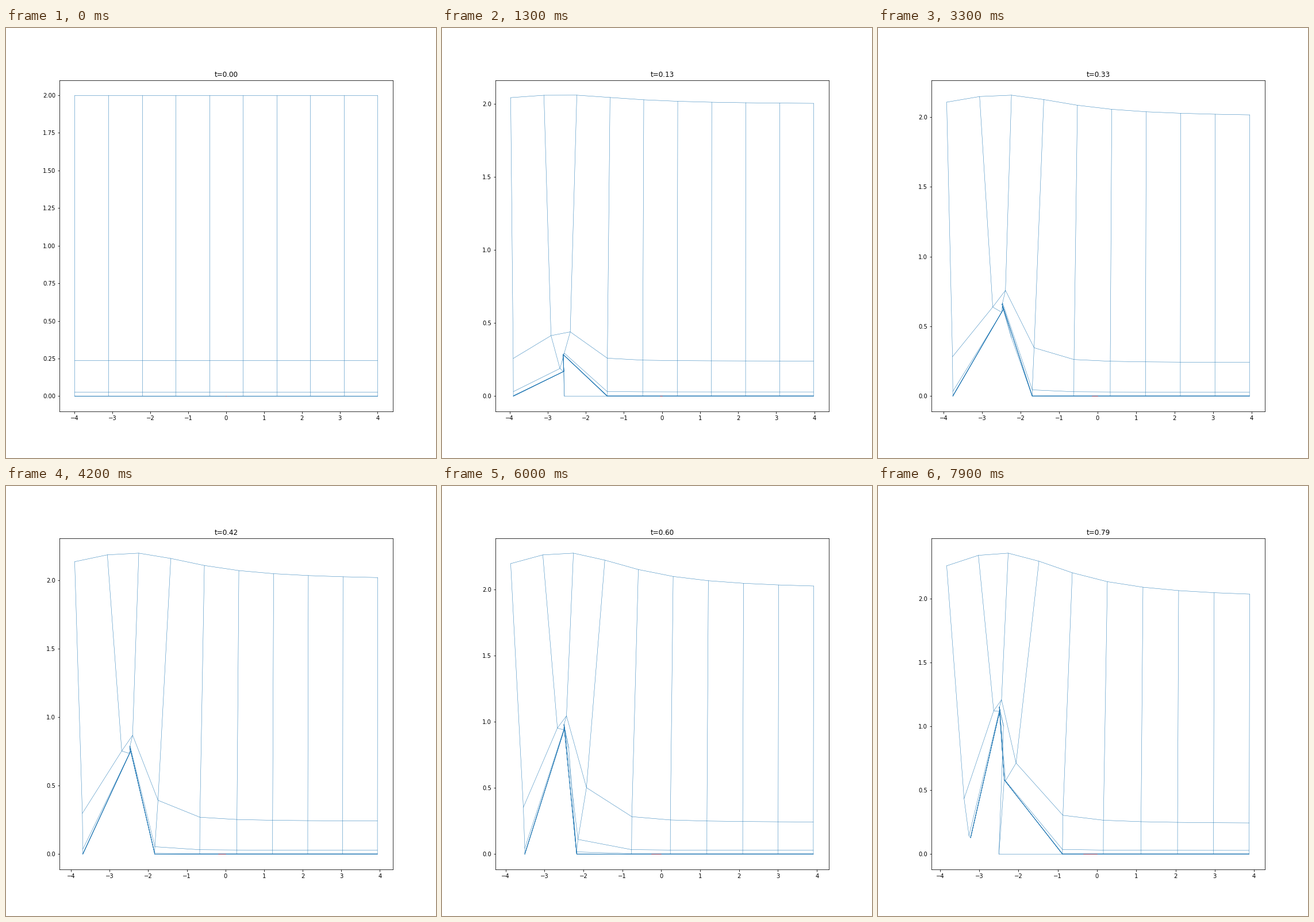
Recreate the animation shown at these times as a matplotlib script. Size 748 by 748 pixels, loop 8000 ms.

```python
import numpy as np
import matplotlib.pyplot as plt
from matplotlib.animation import FuncAnimation

N, FRAMES, SUBSTEPS = 10, 80, 10
DT = .01 / SUBSTEPS
SIZE = 748

# Position of the sink on the real axis: (until, first, last)
DRIVE = [(.22, -2.72, -2.45), (.33, -2.24, -2.24), (.51, -2.46, -2.46),
         (.59, -2.80, -2.80), (.775, -2.27, -2.48), (.81, -3.22, -3.22)]


def sink(t):
    begin = 0
    for until, first, last in DRIVE:
        if t < until:
            return first + (last - first) * (t - begin) / (until - begin)
        begin = until
    return last


def step(z, c):
    """Advance dz/dt = -1 / (z - c) exactly over DT, in the upper half plane."""
    d = z - c
    # Wall points well to the left of the sink are free to leave the wall
    d = np.where((d.imag == 0) & (d.real < -.1), d + 1e-9j, d)
    wall = np.sign(d.real) * np.sqrt(np.maximum(d.real ** 2 - 2 * DT, 0))
    root = np.sqrt(d * d - 2 * DT)
    root = np.where(root.imag < 0, -root, root)
    return c + np.where(d.imag == 0, wall, root)


def simulate():
    heights = np.append(2 * .12 ** np.arange(N - 1), 0)
    grid = np.linspace(-4, 4, N) + 1j * heights[:, None]
    z = np.append(grid.ravel(), 0)          # the last point is the tracer
    states = []
    for f in range(FRAMES):
        states.append(z)
        for s in range(SUBSTEPS):
            z = step(z, sink((f * SUBSTEPS + s + .5) * DT))
    return states


states = simulate()

fig, ax = plt.subplots(figsize=(SIZE / 72, SIZE / 72), dpi=72)
fig.subplots_adjust(left=.1245, right=.8995, bottom=.1088, top=.8788)
rows = [ax.plot([], [], color='C0', lw=.5)[0] for _ in range(N)]
cols = [ax.plot([], [], color='C0', lw=.5)[0] for _ in range(N)]
trail, = ax.plot([], [], color='red', lw=.5)
title = ax.set_title('')


def update(frame):
    z = states[frame]
    grid = z[:-1].reshape(N, N)
    for line, p in zip(rows + cols, [*grid, *grid.T]):
        line.set_data(p.real, p.imag)
    trail.set_data([z[-1].real - .01, 0], [0, 0])
    title.set_text(f't={frame / 100:.2f}')
    ax.relim()
    ax.autoscale_view()
    return rows + cols + [trail, title]


anim = FuncAnimation(fig, update, frames=FRAMES, interval=100,
                     repeat=True, repeat_delay=0, blit=False)
plt.show()
```
